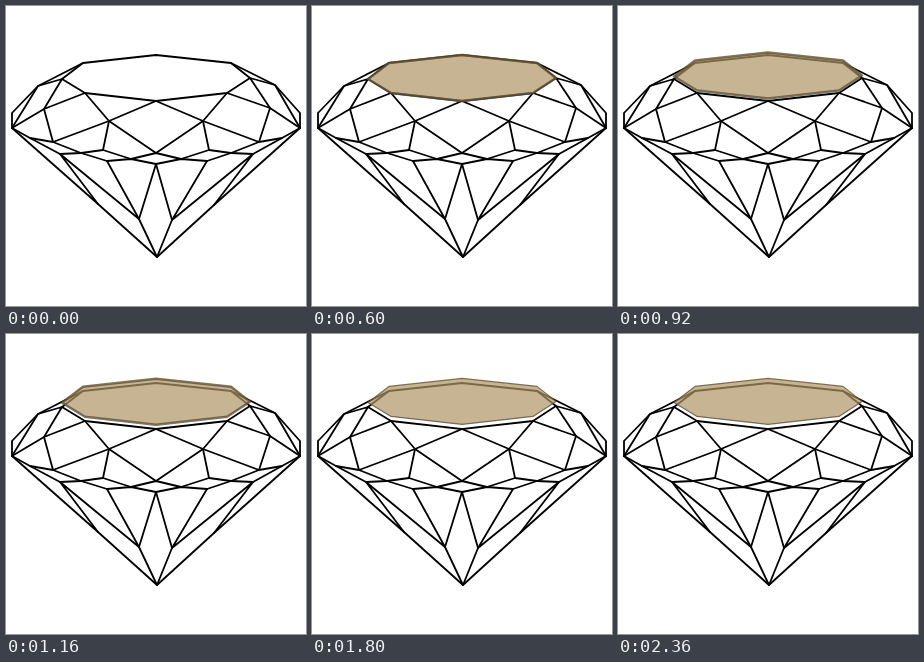
Write an HTML page that moves like this. It is 300 px wide and 300 px high and loops after 2400 ms.

```html
<!DOCTYPE html>
<html lang="en">
<head>
<meta charset="utf-8">
<title>Diamond</title>
<style>
html, body { margin: 0; width: 100%; height: 100%; overflow: hidden; background: #fff; }
svg { display: block; width: 100vw; height: 100vh; }
path { stroke-linejoin: round; stroke-linecap: round; }
</style>
</head>
<body>
<svg viewBox="0 0 300 300">
  <g fill="none" stroke="#000" stroke-width="1.8">
    <!-- table and crown -->
    <path id="table" d="M56 73L77 57L150 49L225 57L244 72L221 87L150 95L79 87Z"/>
    <path d="M77 57L32 80L6 107V122M225 57L269 79L294 107V122"/>
    <path d="M6 122L32 80L56 73L38 103L79 87L103 115L150 95L197 115L221 87L264 102L244 72L269 79L294 122"/>
    <path d="M6 122L38 103L47 136L103 115L150 147L197 115L253 136L264 102L294 122"/>
    <path d="M103 115L97 144M197 115L203 144"/>
    <!-- girdle: upper and lower scallops -->
    <path d="M6 122L24 132L47 136L75 147L97 144L125 153L150 147L175 153L203 144L225 147L253 136L276 132L294 122"/>
    <path d="M24 132L54 148L75 147L101 155L125 153L150 158L175 153L201 155L225 147L247 148L276 132"/>
    <!-- pavilion -->
    <path d="M6 122L92 198L151 251L208 199L294 122"/>
    <path d="M92 198L54 148L133 213L101 155M208 199L247 148L166 214L201 155"/>
    <path d="M150 158L133 213L151 251L166 214Z"/>
  </g>
  <path id="lid" fill="#b09466" fill-opacity=".7" stroke="#5f5236" stroke-opacity=".8"/>
</svg>
<script>
const LOOP = 2400, STEP = 40;
const lid = document.getElementById("lid");
lid.setAttribute("d", document.getElementById("table").getAttribute("d"));

const ramp = (t, a, b) => Math.min(1, Math.max(0, (t - a) / (b - a)));

function draw(ms) {
  const t = Math.floor((ms % LOOP) / STEP) * STEP;
  const rise = 4.6 * ramp(t, 600, 1200);
  lid.setAttribute("opacity", ramp(t, 40, 350));
  lid.setAttribute("stroke-width", 2.4 - 1.2 * ramp(t, 1160, 1760));
  lid.setAttribute("transform", `translate(0 ${-rise})`);
}

const start = performance.now();
function tick() {
  draw(performance.now() - start);
  requestAnimationFrame(tick);
}
draw(0);
requestAnimationFrame(tick);
</script>
</body>
</html>
```
